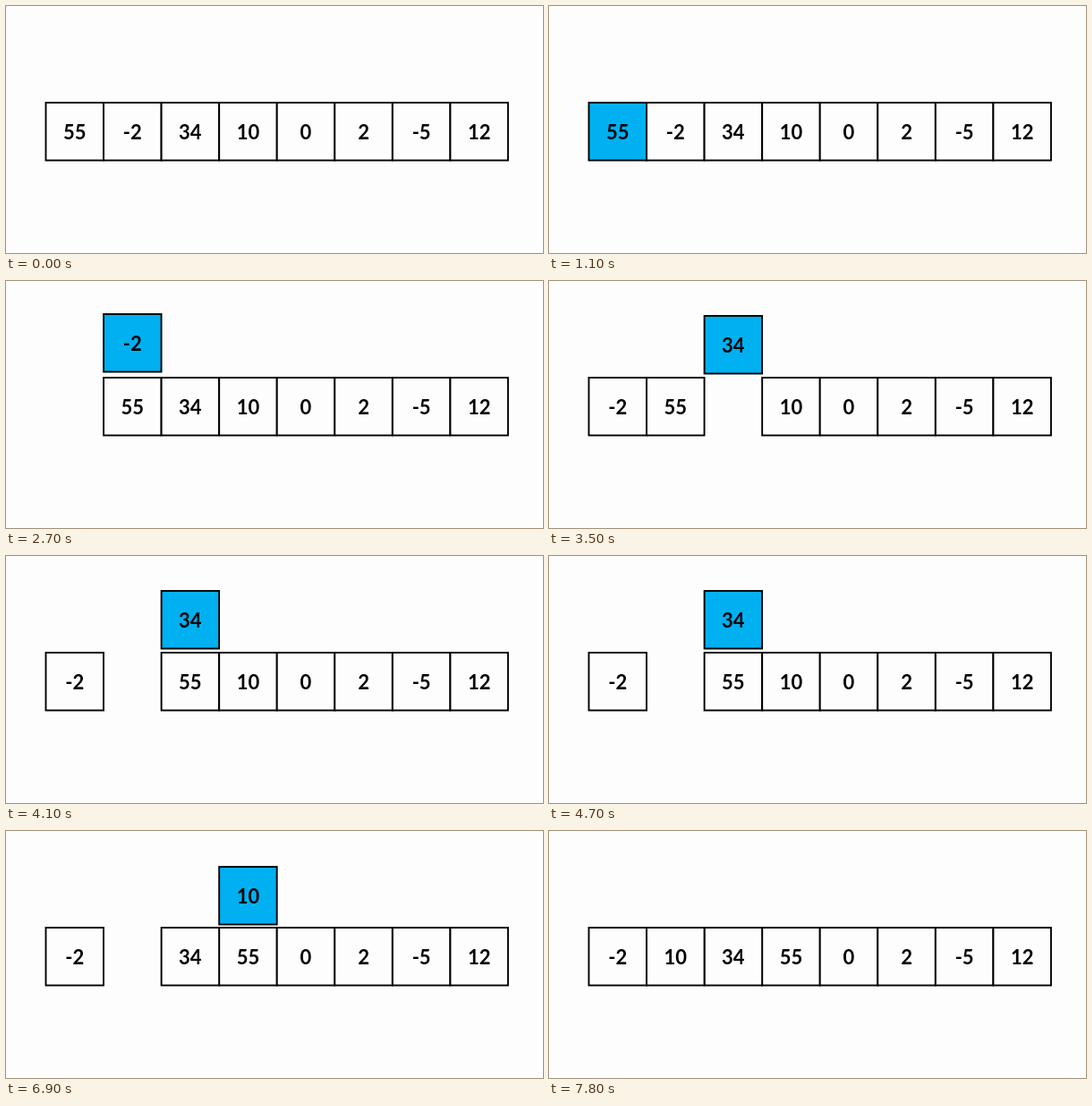
Animation of 600x276 px, one loop 8 s. Source, as an HTML page with a canvas:

```html
<!DOCTYPE html>
<html lang="en">
<head>
<meta charset="utf-8">
<title>Insertion sort</title>
<style>
  html, body { margin: 0; width: 100%; height: 100%; overflow: hidden; background: #fefdfe; }
  canvas { display: block; }
</style>
</head>
<body>
<canvas id="stage" width="600" height="276"></canvas>
<script>
const ctx = document.getElementById('stage').getContext('2d');
const LOOP = 8000;
const LEFT = 44.5, TOP = 108, PITCH = 64.56, SIZE = 64.5;
const PAPER = '#fefdfe', BLUE = '#00b0f0';
const VALUES = [55, -2, 34, 10, 0, 2, -5, 12];

// time, action, slot, and the rise of a lifted cell
const STEPS = [
  [1100, 'mark', 0],
  [1500, 'clear', 0],
  [1800, 'mark', 1],
  [2000, 'lift', 1, 71],
  [2300, 'mark', 0],
  [2600, 'shift', 0],
  [2900, 'drop', 0],
  [3200, 'mark', 2],
  [3500, 'lift', 2, 69],
  [3800, 'mark', 1],
  [4100, 'shift', 1],
  [4300, 'mark', 0],
  [4600, 'clear', 0],
  [5100, 'drop', 1],
  [5400, 'mark', 3],
  [5700, 'lift', 3, 68],
  [6000, 'mark', 2],
  [6300, 'shift', 2],
  [6600, 'mark', 1],
  [6900, 'shift', 1],
  [7200, 'mark', 0],
  [7500, 'clear', 0],
  [7800, 'drop', 1]
];

function stateAt(time) {
  const cells = VALUES.map((value, slot) => ({ value, slot, rise: 0, marked: false }));
  const lifted = () => cells.find(c => c.rise);
  const resting = slot => cells.find(c => c.slot === slot && !c.rise);
  const actions = {
    mark: slot => { resting(slot).marked = true; },
    clear: slot => { resting(slot).marked = false; },
    lift: (slot, rise) => { resting(slot).rise = rise; },
    shift: slot => Object.assign(resting(slot), { slot: slot + 1, marked: false }),
    drop: slot => Object.assign(lifted(), { slot, rise: 0, marked: false })
  };
  for (const [at, action, slot, rise] of STEPS) {
    if (at > time) break;
    actions[action](slot, rise);
  }
  return cells;
}

function drawCell({ value, slot, rise, marked }) {
  const x = LEFT + slot * PITCH, y = TOP - rise;
  ctx.fillStyle = marked ? BLUE : PAPER;
  ctx.fillRect(x, y, SIZE, SIZE);
  ctx.strokeRect(x, y, SIZE, SIZE);
  ctx.fillStyle = '#000';
  ctx.fillText(value, x + SIZE / 2, y + 41);
}

function draw(now) {
  ctx.fillStyle = PAPER;
  ctx.fillRect(0, 0, 600, 276);
  ctx.font = 'bold 22px Lato, sans-serif';
  ctx.textAlign = 'center';
  ctx.lineWidth = 1.9;
  ctx.strokeStyle = '#000';
  stateAt(now % LOOP).sort((a, b) => a.marked - b.marked).forEach(drawCell);
}

const start = performance.now();
function tick() {
  draw(performance.now() - start);
  requestAnimationFrame(tick);
}
tick();
</script>
</body>
</html>
```
